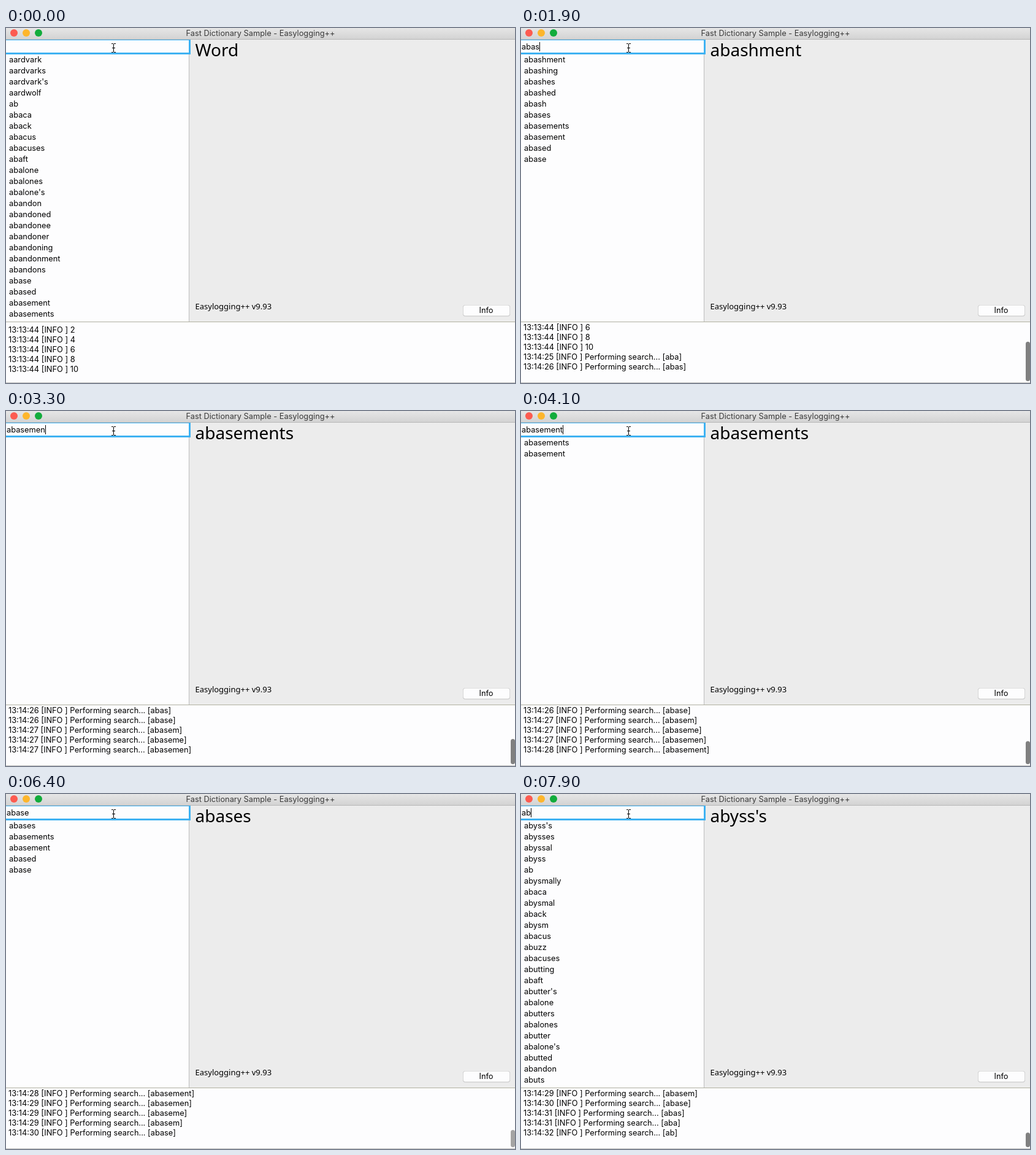
Recreate the animation shown at these times as an HTML page with a canvas. Size 830x578 px, loop 8000 ms.

```html
<!DOCTYPE html>
<html lang="en">
<head>
<meta charset="utf-8">
<title>Fast Dictionary Sample</title>
<style>
html, body { margin: 0; width: 830px; height: 578px; overflow: hidden; }
canvas { display: block; }
</style>
</head>
<body>
<canvas id="stage" width="830" height="578"></canvas>
<script>
const ctx = document.getElementById('stage').getContext('2d');
const LOOP = 8000, ROWS = 24, SEARCH_MS = 200, BLINK = 500;
const UI = '12.8px Inter, sans-serif';
const LABEL = '13px "Noto Sans", sans-serif';
const HEADING = '500 28px "Noto Sans", sans-serif';

const words = s => s.split(' ');
const head = words("aardvark aardvarks aardvark's aardwolf ab abaca aback abacus abacuses abaft abalone abalones abalone's abandon abandoned abandonee abandoner abandoning abandonment abandons abase abased abasement abasements");
const abas = words("abashment abashing abashes abashed abash abases abasements abasement abased abase");
const aba = words("abattoirs abattoir abating abates abatement abated abate abasing").concat(abas);
const tail = words("abyss's abysses abyssal abyss abysmally abysmal abysm abuzz abutting abutter's abutters abutter abutted abuts");

// The first four from the end, then alternating between both ends.
const mixed = tail.slice(0, 4);
for (let i = 4; i < tail.length; i++) mixed.push(head[i], tail[i]);

// Time in ms, length of the typed text, clock second of the logged search
const keys = [
  [1000, 1], [1300, 2], [1400, 3, 25], [1600, 4, 26], [2000, 5, 26],
  [2500, 6, 27], [2900, 7, 27], [3200, 8, 27], [3700, 9, 28],
  [4600, 8, 29], [4900, 7, 29], [5300, 6, 29], [5800, 5, 30],
  [6600, 4, 31], [7100, 3, 31], [7500, 2, 32]
].map(([at, len, sec]) => ({ at, sec, text: 'abasement'.slice(0, len) }));

function search(text) {
  if (text === 'ab') return mixed;
  return (text === 'aba' ? aba : abas).filter(w => w.startsWith(text));
}

function stateAt(t) {
  const s = { text: '', list: head, title: 'Word', keyAt: -BLINK, log: [] };
  for (const n of [2, 4, 6, 8, 10]) s.log.push(`13:13:44 [INFO ] ${n}`);
  keys.forEach((k, i) => {
    if (t < k.at) return;
    s.text = k.text;
    s.keyAt = k.at;
    s.list = [];
    if (!k.sec) return;
    s.log.push(`13:14:${k.sec} [INFO ] Performing search... [${k.text}]`);
    const done = k.at + SEARCH_MS, next = keys[i + 1];
    if (t >= done && (!next || next.at >= done)) {
      s.list = search(k.text);
      s.title = s.list[0];
    }
  });
  return s;
}

function rect(color, x, y, w, h) {
  ctx.fillStyle = color;
  ctx.fillRect(x, y, w, h);
}

function round(color, x, y, w, h, r) {
  ctx.fillStyle = color;
  ctx.beginPath();
  ctx.roundRect(x, y, w, h, r);
  ctx.fill();
}

function write(text, x, y, font = UI, align = 'left', color = '#000') {
  ctx.font = font;
  ctx.textAlign = align;
  ctx.fillStyle = color;
  ctx.fillText(text, x, y);
}

function titleBar() {
  const g = ctx.createLinearGradient(0, 0, 0, 18);
  g.addColorStop(0, '#e6e6e6');
  g.addColorStop(1, '#d3d3d3');
  rect(g, 0, 0, 830, 18);
  rect('#b8b8b8', 0, 18, 830, 1);
  ['#fc5b50', '#fdb62c', '#12ac3c'].forEach((c, i) => round(c, 7 + 20 * i, 2, 12, 12, 6));
  write('Fast Dictionary Sample - Easylogging++', 415, 13, UI, 'center', '#3a3a3a');
}

function inputBox(s, t) {
  rect('#3fb2f2', 0, 19, 301, 24);
  rect('#fdfdfe', 0, 20, 298, 20);
  write(s.text, 1, 35);
  if (Math.floor((t - s.keyAt) / BLINK) % 2 === 0)
    rect('#000', Math.round(1 + ctx.measureText(s.text).width), 23, 1, 15);
}

function pointer() {
  rect('#000', 175, 26, 1, 13);
  rect('#000', 173, 32, 5, 1);
  for (const y of [25, 39]) {
    rect('#000', 172, y, 3, 1);
    rect('#000', 176, y, 3, 1);
  }
}

function logPane(s, t) {
  rect('#b0b0a0', 0, 478, 830, 1);
  rect('#fdfdfe', 0, 479, 830, 98);
  rect('#bcbcbc', 0, 577, 830, 1);
  const n = s.log.length, scrolled = n > 5;
  s.log.slice(-5).forEach((line, i) => write(line, 4, (scrolled ? 492 : 496) + 16 * i));
  if (!scrolled) return;
  const h = 450 / n;
  ctx.globalAlpha = Math.max(0, Math.min(1, 1 - (t - s.keyAt - 500) / 350));
  round('#808080', 823, 575 - h, 7, h, 3.5);
  ctx.globalAlpha = 1;
}

function draw(t) {
  const s = stateAt(t);
  rect('#ececec', 0, 0, 830, 578);
  titleBar();
  rect('#fdfdfe', 0, 42, 298, 436);
  rect('#bcbcbc', 298, 42, 1, 436);
  inputBox(s, t);
  s.list.slice(0, ROWS).forEach((w, i) => write(w, 5, 56 + 18 * i));
  write(s.title, 308.5, 46, HEADING);
  write('Easylogging++ v9.93', 308.5, 458, LABEL);
  round('#c4c4c4', 745, 451, 77, 18.5, 4);
  round('#fdfdfe', 745.7, 451.5, 75.6, 17, 3.5);
  write('Info', 783, 464, UI, 'center');
  logPane(s, t);
  pointer();
}

function frame(now) {
  draw(Math.floor(now % LOOP / 100) * 100);
  requestAnimationFrame(frame);
}
draw(0);
requestAnimationFrame(frame);
</script>
</body>
</html>
```
